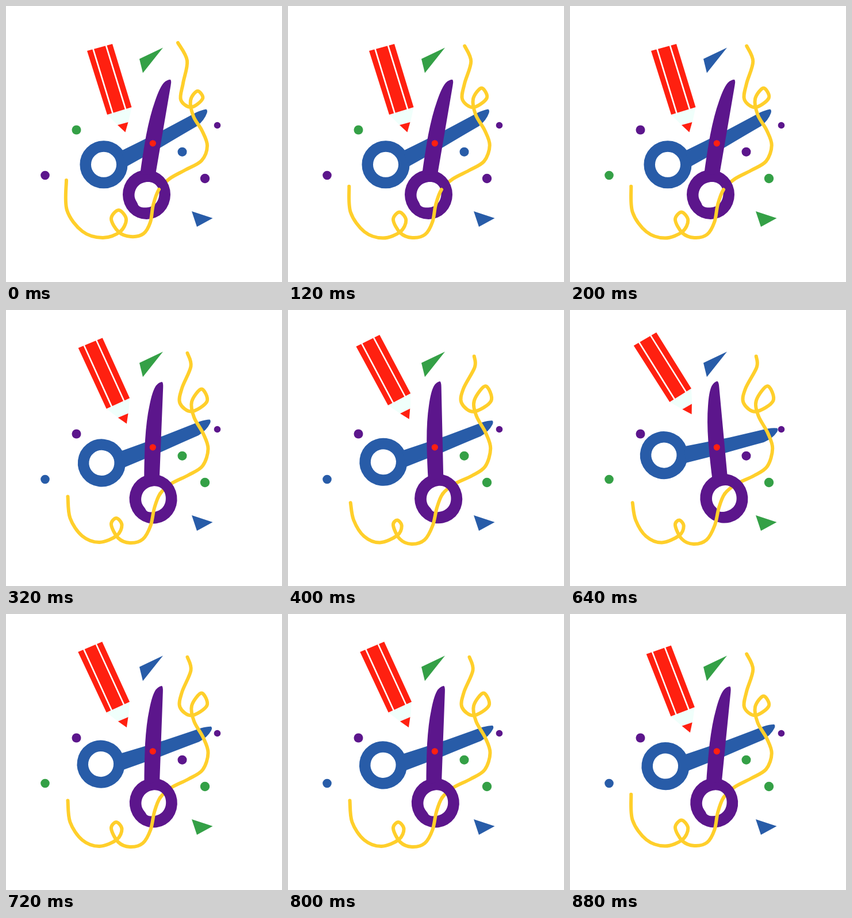
An HTML page that plays this animation: 480x480 px, repeating every 0.96 s.

```html
<!DOCTYPE html>
<html lang="en">
<head>
<meta charset="utf-8">
<title>Craft time</title>
<style>
  html, body { margin: 0; width: 100%; height: 100%; overflow: hidden; background: #fff; }
  svg { display: block; width: 100vw; height: 100vh; }
  .red { fill: #ff2010; }
  .blue { fill: #285ca8; }
  .purple { fill: #5c168c; }
  .green { fill: #34a046; }
  .ribbon { fill: none; stroke: #ffcf2b; stroke-width: 6; stroke-linecap: round; stroke-linejoin: round; }
</style>
</head>
<body>
<svg viewBox="0 0 480 480">
  <g id="confetti">
    <path d="M273 72.500L232 92L238 116.500Z"/>
    <path d="M323 357L359.500 369L332 384Z"/>
    <circle cx="122.500" cy="215.500" r="8"/>
    <circle cx="68" cy="294.500" r="7.800"/>
    <circle cx="367.500" cy="207.500" r="5.800"/>
    <circle cx="306.500" cy="253.700" r="8"/>
    <circle cx="346" cy="300" r="8.200"/>
  </g>

  <g id="pencil">
    <path fill="#f0fffb" d="M176 189L218.500 176L213 202L194 207Z"/>
    <path class="red" d="M141 78L185 66L218.500 176L176 189ZM194 207L212.500 202L207.500 219.500Z"/>
    <path stroke="#fff" stroke-width="2.600" d="M151 73L186 188M173.500 67L208.500 181"/>
  </g>

  <g id="blueBlade" class="blue">
    <circle cx="170" cy="275.800" r="31.800" fill="none" stroke="#285ca8" stroke-width="19.500"/>
    <path d="M200 252L272 216.500L331 185Q341 180.500 348 179.500Q351 181 349.500 186Q345 199 332 209Q306 224 270 245.500L210 279Z"/>
  </g>

  <path id="upper" class="ribbon"/>

  <g id="purpleBlade" class="purple">
    <path fill-rule="evenodd" d="M203 328a41.500 43 0 1 0 83 0a41.500 43 0 1 0 -83 0ZM223.500 329C224 315 234 306 247 306C260 306 267 316 266.500 327C266 341 257 350 244 350.500C236 351 230 349 229 344C227 339 223.500 336 223.500 329Z"/>
    <path d="M233 294Q236.500 266 243.700 225Q250.700 189 259 166Q267 142 274.500 133.500Q280 128 286 128Q288 130 286.500 138L260 293Z"/>
  </g>

  <path id="lower" class="ribbon"/>
  <circle class="red" cx="255.300" cy="238.800" r="5.600"/>
</svg>
<script>
const LOOP = 960, BEAT = 120, TICK = 40, SWING = 15, SPLIT = 14;
const $ = id => document.getElementById(id);
const points = text => text.split(' ').map(p => p.split(',').map(Number));

// Two extreme poses of the ribbon, from its top end to its bottom end.
const loose = points('299,64 315,95 308,134 304,163 322,176 342,161 333,148 321,164 326,192 341,217 350,243 340,269 312,285 285,300 266,319 256,346 251,376 239,396 217,401 196,393 183,370 196,355 209,371 198,393 168,403 133,392 106,355 105,303');
const tight = points('332,86 328,101 304,138 301,161 323,177 357,157 347,127 325,155 328,181 345,213 353,240 344,273 323,289 290,304 270,320 260,343 252,374 237,401 214,409 194,400 183,376 188,369 194,377 187,392 157,405 132,394 117,369 110,346');

const blend = (a, b, u) => a.map((p, i) => p.map((v, k) => v + (b[i][k] - v) * u));

// Catmull-Rom curve through pts[from..to].
function curve(pts, from, to) {
  const at = i => pts[Math.max(0, Math.min(pts.length - 1, i))];
  let d = 'M' + at(from);
  for (let i = from; i < to; i++) {
    const [a, b, c, e] = [at(i - 1), at(i), at(i + 1), at(i + 2)];
    const c1 = b.map((v, k) => v + (c[k] - a[k]) / 6);
    const c2 = c.map((v, k) => v - (e[k] - b[k]) / 6);
    d += `C${c1} ${c2} ${c}`;
  }
  return d;
}

// The second half of the loop runs the first half's motion backwards from full swing.
const thereAndBack = (t, rule) => t < LOOP / 2 ? rule(t) : SWING - rule(t - LOOP / 2);

// Rests two beats, then two held steps.
const stepped = t => [0, 0, 7.4, 11][Math.floor(t / BEAT)];

// Rests two beats, jumps, then creeps for a few ticks.
const creeping = t => t < 2 * BEAT ? 0 : 5.4 + .55 * Math.min(4, Math.floor(t / TICK) - 6);

const colours = ['green', 'blue', 'purple'];
const confetti = ['010', '101', '022', '201', '222', '120', '200']; // colour cycle of each piece

const turn = (id, angle) => $(id).setAttribute('transform', `rotate(${angle} 255 239)`);

function draw(t) {
  const tightness = 1 - Math.abs(4 - Math.floor(t / BEAT)) / 4;
  const pts = blend(loose, tight, tightness);
  $('upper').setAttribute('d', curve(pts, 0, SPLIT));
  $('lower').setAttribute('d', curve(pts, SPLIT, pts.length - 1));

  const swing = thereAndBack(t, stepped);
  const lift = (swing / SWING) ** .8;
  turn('purpleBlade', -swing);
  turn('blueBlade', thereAndBack(t, creeping));
  $('pencil').setAttribute('transform',
    `translate(${4 * lift} ${-38 * lift}) rotate(${-swing} 207 219)`);

  const phase = Math.floor(t / 160) % 3;
  [...$('confetti').children].forEach((el, i) => el.setAttribute('class', colours[confetti[i][phase]]));
}

const start = performance.now();
function frame() {
  draw((performance.now() - start) % LOOP);
  requestAnimationFrame(frame);
}
frame();
</script>
</body>
</html>
```
